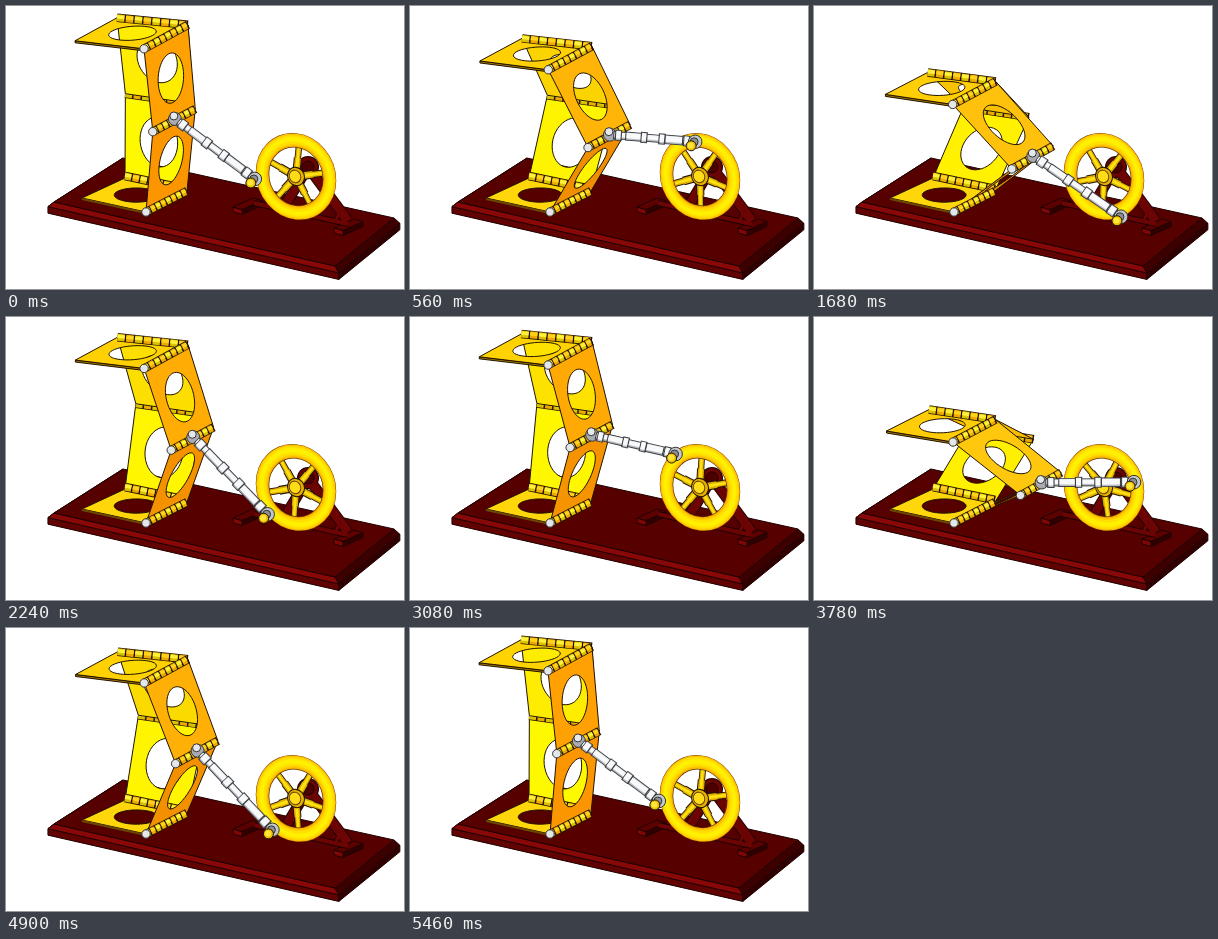
An HTML page with a canvas that plays this animation: 398x283 px, repeating every 5.6 s.

```html
<!DOCTYPE html>
<html lang="en">
<head>
<meta charset="utf-8">
<title>Folding linkage and crank wheel</title>
<style>
html, body { margin: 0; width: 100%; height: 100%; overflow: hidden; background: #fff; }
canvas { display: block; width: 398px; height: 283px; }
</style>
</head>
<body>
<canvas id="stage" width="398" height="283"></canvas>
<script>
const ctx = document.getElementById('stage').getContext('2d');
const STEP = 140, STEPS = 40, TURN = 19.5;
const { PI, sin, cos } = Math;
const RAD = PI / 180, TAU = PI * 2;
const INK = '#201400', RED_INK = '#200000', STEEL_INK = '#333';

const mix = (a, b, t) => a.map((v, i) => v + (b[i] - v) * t);
const move = (p, dx, dy) => [p[0] + dx, p[1] + dy];
const shade = (a, b, t) => `rgb(${mix(a, b, t).map(Math.round).join(',')})`;

// Plate corners on the floor and fully raised: left, front, right, back
const FLOOR = [[76, 192], [140, 206], [181, 185], [119, 172]];
const RAISED = [[69, 34], [138, 42], [182, 18], [111, 11]];
const bilinear = (q, x, y) => mix(mix(q[0], q[1], x), mix(q[3], q[2], x), y);
const project = (x, y, z) => mix(bilinear(FLOOR, x, y), bilinear(RAISED, x, y), z / 2);

// Fold angle of the flaps: a cosine swing that opens a little faster than it closes
function foldAngle(a) {
  const swing = a + 10 * RAD * (1 - cos(a));
  return (5.7 + 28.6 * (1 - cos(swing))) * RAD;
}

// Crank angle: steady, lagging briefly at the dead centre
const crankAngle = a => a + (195 - 27 * cos(a / 2) ** 24) * RAD;

function trace(pts) {
  pts.forEach((p, i) => i ? ctx.lineTo(...p) : ctx.moveTo(...p));
  ctx.closePath();
}

function paint(fill, ink) {
  ctx.fillStyle = fill;
  ctx.fill('evenodd');
  if (!ink) return;
  ctx.strokeStyle = ink;
  ctx.lineWidth = 1;
  ctx.stroke();
}

function poly(fill, pts, ink = INK) {
  ctx.beginPath();
  trace(pts);
  paint(fill, ink);
}

function disc([x, y], r, fill, ink = INK) {
  ctx.beginPath();
  ctx.arc(x, y, r, 0, TAU);
  paint(fill, ink);
}

function line(a, b, color, width) {
  ctx.strokeStyle = color;
  ctx.lineWidth = width;
  ctx.beginPath();
  ctx.moveTo(...a);
  ctx.lineTo(...b);
  ctx.stroke();
}

// Flat panel with a round hole
function panel(fill, q) {
  const hole = [];
  for (let a = 0; a < TAU; a += TAU / 40) {
    hole.push(bilinear(q, .52 + .29 * cos(a), .5 + .29 * sin(a)));
  }
  ctx.beginPath();
  trace(q);
  trace(hole);
  paint(fill, INK);
}

// Row of hinge knuckles
function hinge(a, b, cap) {
  const n = 8, gap = 1.5 / Math.hypot(b[0] - a[0], b[1] - a[1]);
  line(a, b, INK, 8.5);
  for (let i = 0; i < n; i++) {
    const p = mix(a, b, i / n), q = mix(a, b, (i + 1) / n - gap);
    line(p, q, i % 2 ? '#f0a800' : '#dcc000', 7);
    line(move(p, 0, -1), move(q, 0, -1), i % 2 ? '#ffd21c' : '#fff03a', 3.5);
  }
  if (cap) disc(a, 4.2, '#e4e6ea', STEEL_INK);
}

function drawBase() {
  const top = [[48, 196], [329, 260], [388, 212], [117, 152]];
  const mid = bilinear(top, .5, .5);
  const rim = top.map(p => move(mix(mid, p, 1.035), 0, 5));
  const foot = rim.map(p => move(p, 0, 6.5));
  const band = (up, low, i, fill) => poly(fill, [up[i], up[i + 1], low[i + 1], low[i]], RED_INK);
  poly('#550000', [top[3], rim[3], rim[0], top[0]], RED_INK);
  band(rim, foot, 0, '#620303');
  band(rim, foot, 1, '#300000');
  band(top, rim, 0, '#880707');
  band(top, rim, 1, '#3c0000');
  poly('#560000', top, RED_INK);
}

function drawFoot(p) {
  const a = move(p, 20, -9), b = move(a, 9, 2.5), c = move(p, 9, 2.5);
  poly('#300000', [c, b, move(b, 0, 5), move(c, 0, 5)], RED_INK);
  poly('#800606', [p, c, move(c, 0, 5), move(p, 0, 5)], RED_INK);
  poly('#5c0000', [p, a, b, c], RED_INK);
}

function drawStand() {
  const bearing = [302, 161];
  drawFoot([227, 201]);
  drawFoot([328, 222]);
  for (const [color, extra] of [[RED_INK, 2], ['#6c0404', 0]]) {
    line([248, 197], [342, 218], color, 4 + extra);
    line(bearing, [281, 196], color, 9 + extra);
    line(bearing, [342, 215], color, 9 + extra);
    line([335, 203], [329, 216], color, 3 + extra);
    disc(bearing, 10 + extra / 2, color, null);
  }
  disc(bearing, 6, '#4c0000', RED_INK);
}

function ring(r, width, color) {
  ctx.beginPath();
  ctx.arc(0, 0, r, 0, TAU);
  ctx.strokeStyle = color;
  ctx.lineWidth = width;
  ctx.stroke();
}

function drawWheel(crank) {
  ctx.save();
  ctx.transform(1, .1, 0, 1.075, 290, 170.5);
  for (const [color, w] of [[INK, 8], ['#e0ac00', 6], ['#ffe010', 3]]) {
    for (let k = 0; k < 5; k++) {
      const a = crank + (k + .5) * TAU / 5, tip = [cos(a) * 29, sin(a) * 29];
      line([0, 0], mix([0, 0], tip, .6), color, w);
      line(mix([0, 0], tip, .55), tip, color, w * .8);
    }
  }
  ring(33.5, 13.5, '#5a3c00');
  ring(33.7, 12.4, '#ffb000');
  ring(34, 10.4, '#ffcc00');
  ring(34.2, 8, '#ffe000');
  ring(34.4, 4, '#fff000');
  disc([0, 0], 8.5, '#e8b000');
  disc([-1, 0], 5.8, '#ffdc18', '#6a4800');
  ctx.restore();
}

function drawRod(a, b) {
  const part = (t0, t1, w) => {
    const p = mix(a, b, t0), q = mix(a, b, t1);
    line(p, q, '#3c3e42', w);
    const t = 1.2 / Math.hypot(q[0] - p[0], q[1] - p[1]);
    const p1 = mix(p, q, t), q1 = mix(q, p, t);
    line(p1, q1, '#b8bcc2', w - 1.8);
    line(move(p1, 0, -.6), move(q1, 0, -.6), '#f8f9fa', w - 3.6);
  };
  disc(a, 6.5, '#a8acb2', STEEL_INK);
  disc(move(a, -1, -3), 4, '#e6e8ec', STEEL_INK);
  part(.04, .95, 8);
  part(.18, .38, 9);
  part(.64, .86, 9.5);
  for (const t of [.06, .36, .57, .86]) part(t, t + .08, 11);
  disc(b, 6.8, '#c4c8cc', STEEL_INK);
  disc(move(b, -1, 0), 4, '#8c9094', STEEL_INK);
}

function draw(step) {
  const turn = TAU * step / TURN;
  const fold = foldAngle(turn), crank = crankAngle(turn);
  const out = sin(fold), z = cos(fold);
  const x = 1 + 1.18 * out, y = 1 + 1.03 * out;

  const [a0, b0, c0, d0] = FLOOR;
  const [a2, b2, c2, d2] = FLOOR.map((p, i) => mix(p, RAISED[i], z));
  const rightFront = project(x, 0, z), rightBack = project(x, 1, z);
  const backLeft = move(project(0, y, z), 0, -2), backRight = move(project(1, y, z), 1, -2);

  ctx.fillStyle = '#fff';
  ctx.fillRect(0, 0, 398, 283);
  ctx.lineJoin = 'round';
  drawBase();

  panel(shade([255, 250, 0], [255, 238, 0], out), [d0, c0, backRight, backLeft]);
  hinge(backLeft, backRight, false);
  panel(shade([255, 244, 0], [246, 178, 0], out), [backLeft, backRight, c2, d2]);

  panel('#ffd60a', [a0, b0, c0, d0]);
  line(move(a0, 0, 1), move(b0, 0, 1), '#6a4800', 2);
  hinge(move(d0, 0, -2), move(c0, 0, -2), false);
  panel(shade([255, 152, 0], [222, 132, 0], out), [b0, c0, rightBack, rightFront]);
  hinge(b0, c0, true);

  panel(shade([255, 156, 0], [255, 206, 16], out), [rightFront, rightBack, c2, b2]);
  hinge(rightFront, rightBack, true);

  poly('#a87400', [a2, b2, move(b2, 0, 2), move(a2, 0, 2)]);
  panel(shade([255, 212, 0], [255, 204, 8], out), [a2, b2, c2, d2]);
  hinge(d2, c2, false);
  hinge(b2, c2, true);

  drawStand();
  drawWheel(crank);

  const dx = 38 * cos(crank);
  const pin = [283 + dx, 177 + .24 * dx + 38 * sin(crank)];
  drawRod(move(mix(rightFront, rightBack, .52), 0, -1), move(pin, 3, -3));
  disc(move(pin, -1, 1), 5, '#f0c000');
  disc(move(pin, -1.4, .7), 3, '#ffe63c', null);
}

const start = performance.now();
let shown = -1;
function tick() {
  const step = Math.floor((performance.now() - start) / STEP) % STEPS;
  if (step !== shown) draw(shown = step);
  requestAnimationFrame(tick);
}
tick();
</script>
</body>
</html>
```
